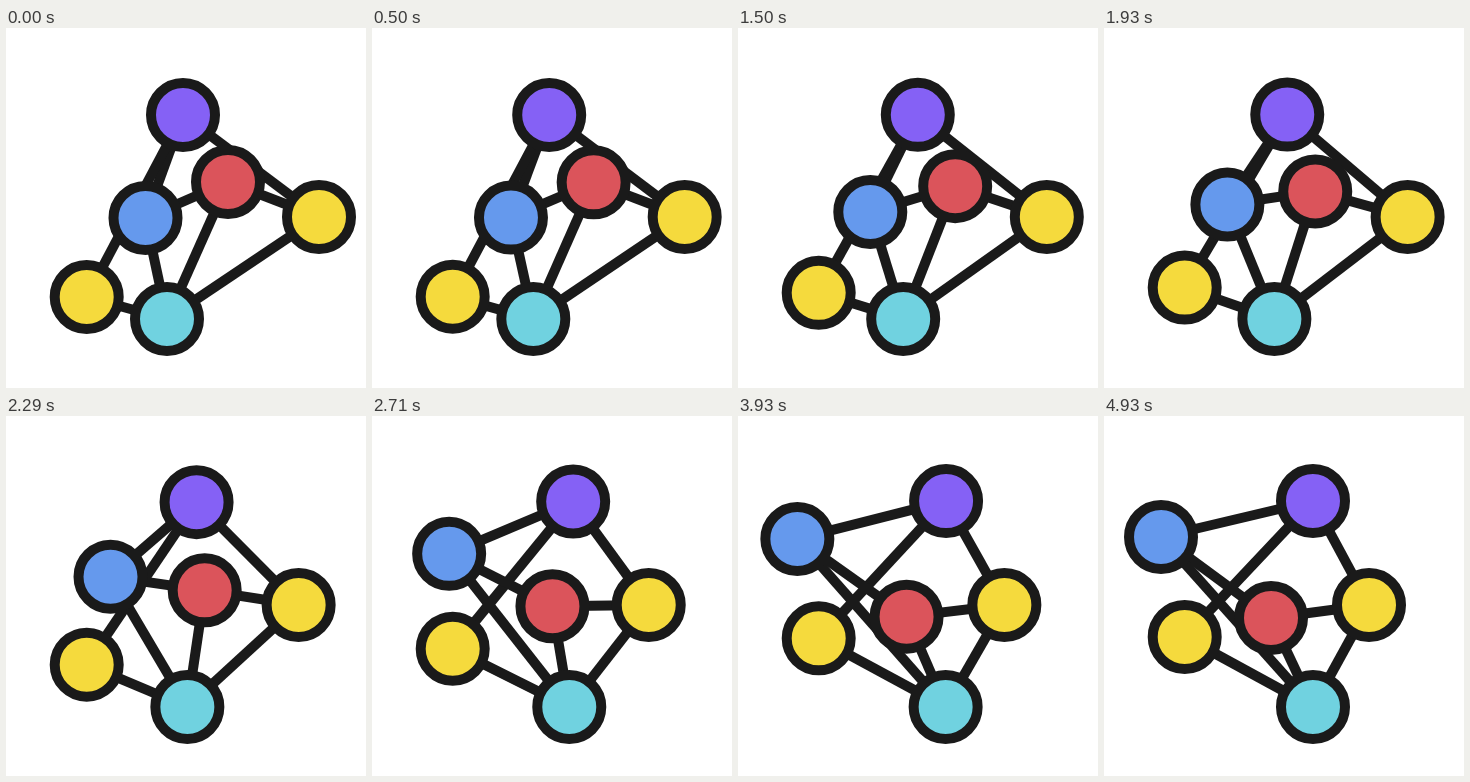
Write an HTML page with a canvas that moves like this. It is 360 by 360 pixels and loops after 5000 ms.

```html
<!DOCTYPE html>
<html lang="en">
<head>
<meta charset="utf-8">
<title>Shifting graph</title>
<style>
  html, body { margin: 0; height: 100%; overflow: hidden; background: #fff; }
  canvas { display: block; }
</style>
</head>
<body>
<canvas width="360" height="360"></canvas>
<script>
const ctx = document.querySelector("canvas").getContext("2d");
const DURATION = 5000, FPS = 14, INK = "#1a1a1a";

const nodes = {
  purple: { color: "#8561f5", from: [177, 87], to: [209, 85] },
  red: { color: "#db545b", from: [222, 154], to: [167, 202] },
  blue: { color: "#6599ed", from: [139.5, 190], to: [57, 121] },
  right: { color: "#f5da3d", from: [313, 189], to: [265, 189] },
  left: { color: "#f5da3d", from: [80.7, 269], to: [80.7, 221] },
  cyan: { color: "#70d2e0", from: [161, 291], to: [209, 291] },
};

const edges = [
  ["purple", "blue"], ["purple", "left"], ["purple", "right"],
  ["blue", "red"], ["red", "right"], ["blue", "cyan"],
  ["left", "cyan"], ["red", "cyan"], ["right", "cyan"],
];

// Same curve as cubic-bezier(.77, 0, .155, 1), solved by bisection.
function ease(x) {
  let lo = 0, hi = 1;
  for (let i = 0; i < 24; i++) {
    const s = (lo + hi) / 2, r = 1 - s;
    if (3 * 0.77 * s * r * r + 3 * 0.155 * s * s * r + s ** 3 < x) lo = s;
    else hi = s;
  }
  return lo * lo * (3 - 2 * lo);
}

function draw(now) {
  // Motion advances in steps of 1/14 s.
  const step = Math.floor(((now % DURATION) + 5) / 1000 * FPS);
  const p = ease(Math.min(step / FPS * 1000 / DURATION, 1));
  const at = ({ from, to }) => from.map((v, i) => v + (to[i] - v) * p);

  ctx.clearRect(0, 0, 360, 360);
  ctx.strokeStyle = INK;
  ctx.lineWidth = 10;

  for (const [a, b] of edges) {
    ctx.beginPath();
    ctx.moveTo(...at(nodes[a]));
    ctx.lineTo(...at(nodes[b]));
    ctx.stroke();
  }

  for (const node of Object.values(nodes)) {
    ctx.beginPath();
    ctx.arc(...at(node), 32, 0, Math.PI * 2);
    ctx.fillStyle = node.color;
    ctx.fill();
    ctx.stroke();
  }
}

const start = performance.now();
function tick() {
  draw(performance.now() - start);
  requestAnimationFrame(tick);
}
tick();
</script>
</body>
</html>
```
